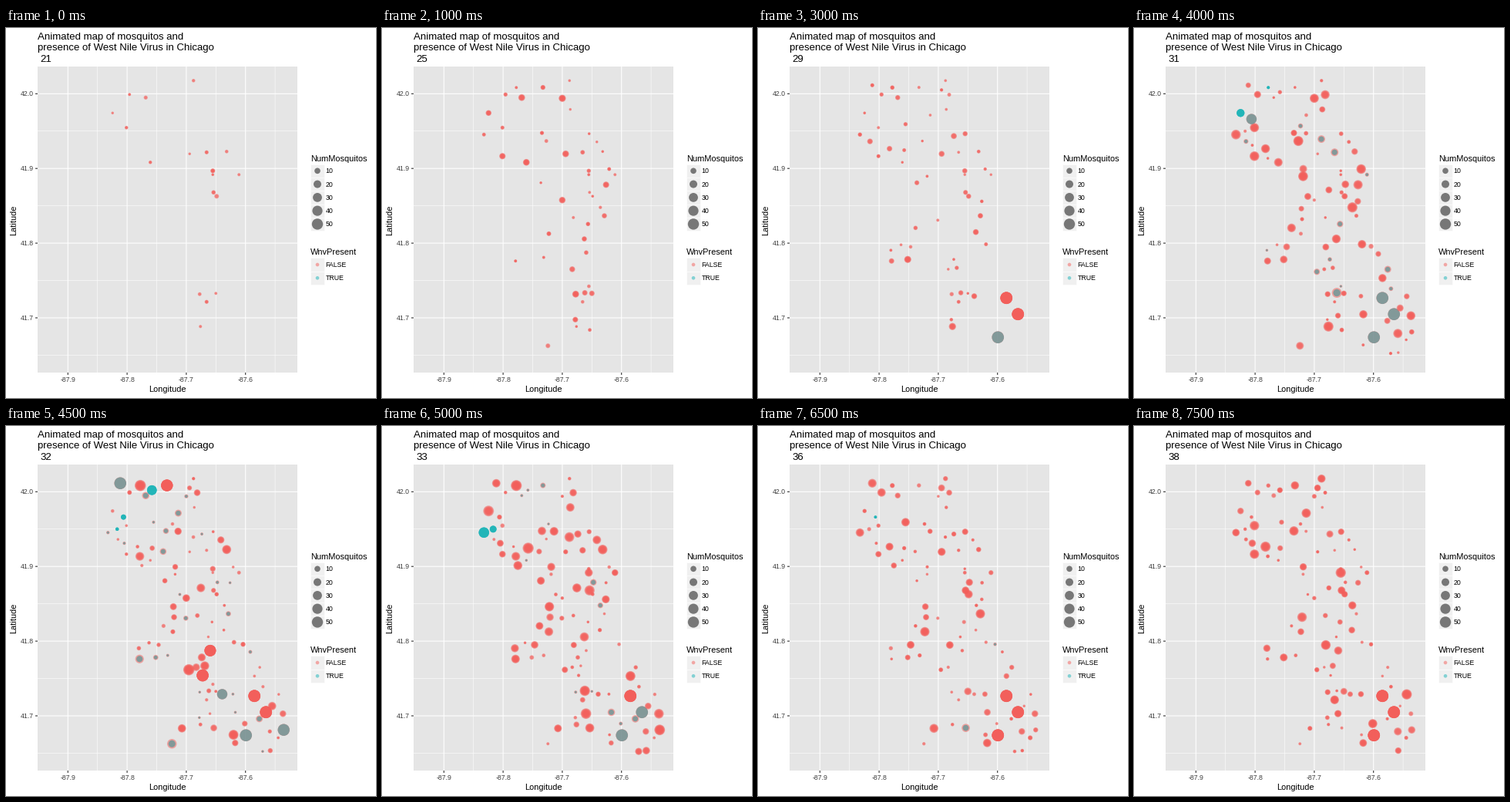
These frames come from a looping animation (480 px wide and 480 px high, 8000 ms). A matplotlib script:

```python
import numpy as np
import matplotlib.pyplot as plt
from matplotlib.animation import FuncAnimation
from matplotlib.colors import to_rgb
from matplotlib.patches import Circle, Rectangle
from matplotlib.path import Path

SIZE, DPI = 480, 100
PX = 72 / DPI
RED, TEAL = to_rgb("#F35E5A"), to_rgb("#17B3B7")
ALPHA = 0.5
LEFT, TOP, RIGHT, BOTTOM = 41, 50, 378, 447
WEEKS = [21, 22, *range(25, 39)]

# Traps that open the season, traps with large catches, and the outline of the city
EARLY = [
    (243, 68), (160, 86), (181, 90), (138, 110), (156, 129), (187, 174), (238, 163), (260, 161),
    (286, 160), (268, 185), (268, 190), (302, 190), (269, 213), (273, 218), (251, 345), (272, 344),
    (260, 355), (252, 387),
]
HUBS = [
    (311, 401), (322, 350), (337, 371), (359, 373), (360, 394), (342, 396), (215, 412), (228, 392),
    (148, 74), (174, 77), (132, 138), (156, 166), (173, 302), (194, 300),
]
OUTLINE = [
    (136, 100), (146, 72), (245, 66), (265, 73), (250, 118), (290, 158), (304, 190), (292, 255),
    (324, 280), (342, 312), (365, 358), (358, 418), (306, 431), (232, 368), (250, 335), (192, 320),
    (155, 282), (212, 252), (214, 215), (155, 168), (132, 140),
]
N_SITES, GAP, HOT = 112, 9, 3


def scatter_sites():
    """Fill the outline with further traps that keep a minimum distance."""
    rng, city = np.random.default_rng(4), Path(OUTLINE)
    sites = [np.array(p, float) for p in EARLY + HUBS]
    while len(sites) < N_SITES:
        p = rng.uniform((130, 64), (367, 432))
        if city.contains_point(p) and min(np.hypot(*(p - q)) for q in sites) > GAP:
            sites.append(p)
    return np.array(sites)


SITES = scatter_sites()
X, Y = SITES.T
INDEX = np.arange(N_SITES)
IS_EARLY = INDEX < len(EARLY)
IS_HUB = ~IS_EARLY & (INDEX < len(EARLY + HUBS))
IS_HOT = IS_HUB & (INDEX < len(EARLY) + HOT)
SOUTH_EAST = (X > 285) & (Y > 330)
NORTH_WEST = (X < 205) & (Y < 150)


def active_sites(week, share, pick):
    if week == 34:
        return SOUTH_EAST & (pick < 0.75) | IS_HOT
    on = IS_EARLY | (pick < np.where(IS_HUB, share ** 0.5, share))
    if week < 27:
        on &= X < 305
    if week < 30:
        on &= ~SOUTH_EAST
    return on | IS_HOT if week >= 29 else on


def discs(r, kind, roll):
    """Stacked translucent discs (radius, colour) for one trap."""
    if kind == "true":
        return [(r, TEAL)] * 4
    if kind == "mix":
        inner = r if r > 6.5 else 0.72 * r
        return [(r, RED), (inner, RED), (inner, TEAL)]
    if r > 7.4:
        return [(r, RED)] * 6
    n = 1 + int(2 * roll + r / 1.8)
    return [(r * (1 - 0.5 * j / n), RED) for j in range(n)]


def catches(week):
    rng = np.random.default_rng(week)
    pick, catch, roll, sick = rng.random((4, N_SITES))
    keys = (21, 25, 27, 29, 32, 36, 38)
    share = np.interp(week, keys, (0, 0.35, 0.6, 0.42, 0.95, 0.72, 0.8))
    spread = np.interp(week, keys, (1.4, 3, 5, 3, 6, 4.5, 5))
    virus = 0.24 * np.exp(-abs(week - 32) / 1.6) if week > 29 else 0

    radius = 1.8 + spread * np.where(IS_HUB, catch, catch ** 2)
    if week >= 29:
        radius[IS_HOT] = 7.8
    chance = np.where(NORTH_WEST, 2.2, 1) * virus
    positive = sick < chance
    positive[len(EARLY)] = 29 <= week <= 33

    xy, rad, col = [], [], []
    for i in np.flatnonzero(active_sites(week, share, pick)):
        kind = None
        if positive[i]:
            kind = "true" if NORTH_WEST[i] and roll[i] < 0.7 else "mix"
        for r, c in discs(radius[i], kind, roll[i]):
            xy.append(SITES[i] + 0.25)
            rad.append(r)
            col.append((*c, ALPHA))
    return np.array(xy), np.array(rad), col


def label(x, y, s, px=8.8, color="black", **kw):
    kw.setdefault("va", "baseline")
    return ax.text(x, y, s, fontsize=px * PX, color=color, **kw)


def line(xs, ys, color, px):
    ax.plot(xs, ys, color=color, lw=px * PX, zorder=1, solid_capstyle="butt", snap=False)


plt.rcParams["font.family"] = "Liberation Sans"
fig = plt.figure(figsize=(SIZE / DPI, SIZE / DPI), dpi=DPI, facecolor="white")
ax = fig.add_axes([0, 0, 1, 1])
ax.set(xlim=(0, SIZE), ylim=(SIZE, 0))
ax.axis("off")

# Panel, grid and axes
ax.add_patch(Rectangle((LEFT, TOP), RIGHT - LEFT, BOTTOM - TOP, fc="#E5E5E5", lw=0, zorder=0))
for k in range(4):
    x, y = 80.3 + 76.8 * k, 85.3 + 96.9 * k
    for dx, dy, px in ((0, 0, 1.1), (38.4, 48.4, 0.55)):
        line([x + dx] * 2, [TOP, BOTTOM], "white", px)
        line([LEFT, RIGHT], [y + dy] * 2, "white", px)
    line([x, x], [BOTTOM, BOTTOM + 3], "#333333", 1.1)
    line([LEFT - 3, LEFT], [y, y], "#333333", 1.1)
    label(x, 459, f"-{87.9 - 0.1 * k:.1f}", color="#404040", ha="center")
    label(36, y + 3, f"{42 - 0.1 * k:.1f}", color="#404040", ha="right")
label(209.5, 472, "Longitude", 11, ha="center")
label(10, 249.5, "Latitude", 11, ha="center", va="center", rotation=90)

# Title
label(41, 15, "Animated map of mosquitos and", 13.2)
label(41, 29.5, "presence of West Nile Virus in Chicago", 13.2)
counter = label(44.7, 44, "", 13.2)


def key(y, text, r, color):
    ax.add_patch(Rectangle((395.4, y - 8.64), 17.28, 17.28, fc="#F0F0F0", ec="white",
                           lw=0.5 * PX, zorder=1))
    ax.add_patch(Circle((404, y), r, fc=(*color, ALPHA), lw=0, zorder=2))
    label(414.7, y + 3, text)


# Legends
label(395, 173, "NumMosquitos", 11)
for k, r in enumerate((3.8, 5, 5.9, 6.6, 7.2)):
    key(185.3 + 17.28 * k, str(10 * (k + 1)), r, (0, 0, 0))
label(395, 294, "WnvPresent", 11)
key(307, "FALSE", 2.3, RED)
key(324.3, "TRUE", 2.3, TEAL)

dots = ax.scatter([], [], lw=0, zorder=3)


def draw(i):
    xy, rad, col = catches(WEEKS[i])
    dots.set_offsets(xy)
    dots.set_sizes((2 * rad * PX) ** 2)
    dots.set_facecolor(col)
    counter.set_text(str(WEEKS[i]))
    return dots, counter


anim = FuncAnimation(fig, draw, frames=len(WEEKS), interval=500, repeat=True, repeat_delay=0)
plt.show()
```
